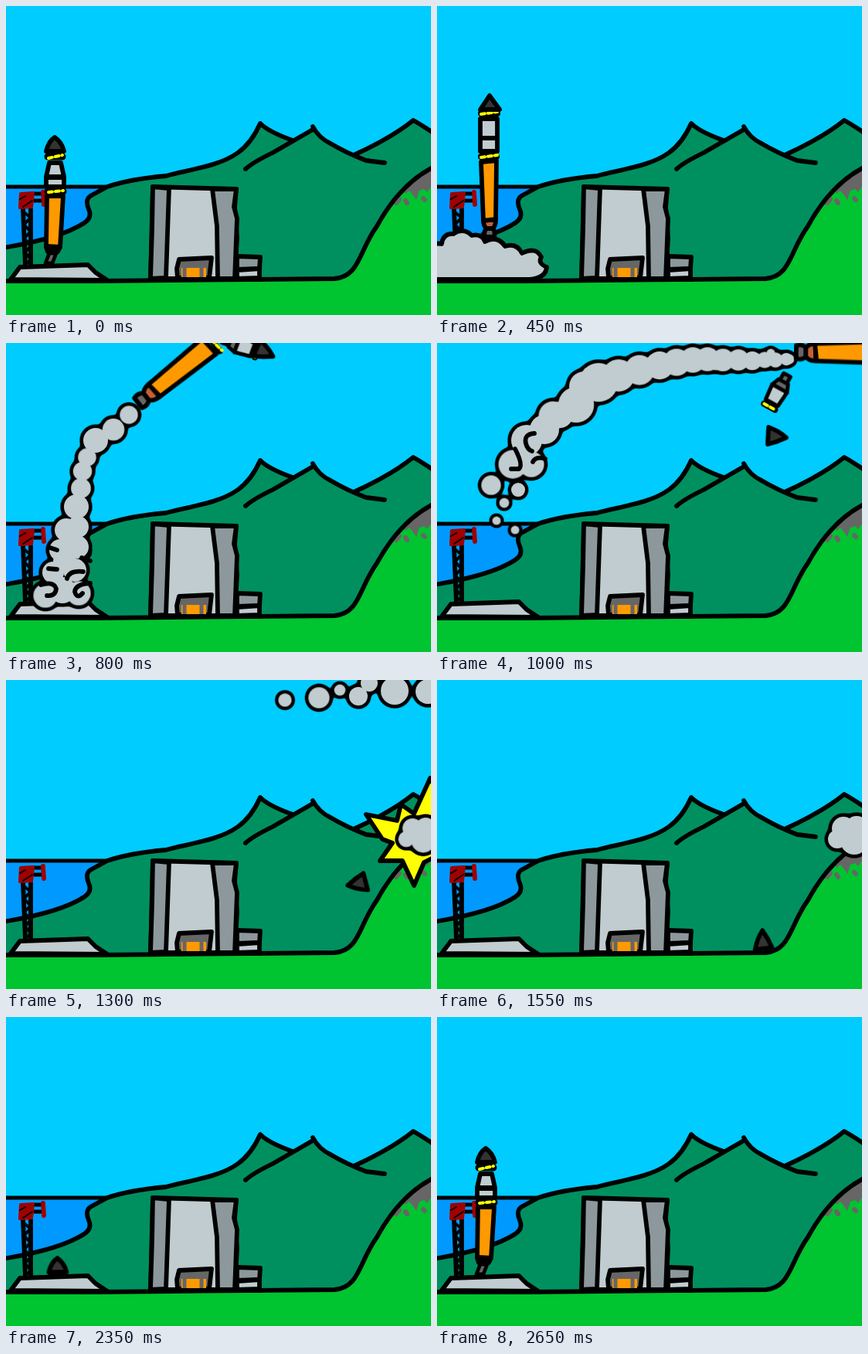
These frames come from a looping animation (550 by 400 pixels, 2.7 s). An HTML page without scripts:

```html
<!DOCTYPE html>
<html lang="en">
<head>
<meta charset="utf-8">
<title>Rocket launch loop</title>
<style>
html, body { margin: 0; width: 100%; height: 100%; overflow: hidden; background: #0cf; }
svg { display: block; width: 100vw; height: 100vh; }
.ink { stroke: #000; stroke-width: 5.8; stroke-linejoin: round; stroke-linecap: round; }
.thin { stroke-width: 4.8; }
.line { fill: none; }
.pale { fill: #c0cccf; }
.steel { fill: #8c989c; }
.dark { fill: #333; }
.grey { fill: #666; }
.orange { fill: #f90; }
.rust { fill: #c66035; }
.yellow { fill: #ff0; }
.stripes { stroke: #ff0; stroke-width: 4; stroke-dasharray: 5 4; fill: none; }
.flight path { vector-effect: non-scaling-stroke; }

.parked, .flight, .upper, .stage, .cone, .puff, .curl, .cloud, .blast {
  animation: 2.7s steps(2) infinite both;
}
.parked { animation-name: parked; }
.flight { animation-name: flight; }
.upper { animation-name: upper; }
.stage { animation-name: stage; }
.cone { animation-name: cone; }
.cloud { animation-name: cloud; transform-origin: 68px 354px; }
.blast { animation-name: blast; transform-origin: 527px 200px; }
.puff, .curl { animation-delay: calc(var(--t) * 1ms); }
.curl { animation-name: curl; }
.puff {
  animation-name: puff;
  animation-timing-function: linear;
  transform-box: fill-box;
  transform-origin: center;
}
.slow { animation-name: slow-puff; }

@keyframes parked {
  0% { opacity: 1; transform: none; animation-timing-function: steps(1); }
  9.25% { opacity: 0; transform: translate(4px, 166px); animation-timing-function: steps(1); }
  85.18% { opacity: 1; transform: translate(4px, 166px); animation-timing-function: steps(7); }
  98.14%, 100% { opacity: 1; transform: none; }
}
@keyframes flight {
  0% { opacity: 0; transform: translate(62px, 314px) scale(.95); animation-timing-function: steps(1); }
  9.25% { opacity: 1; transform: translate(62px, 314px) scale(.95); }
  12.95% { transform: translate(64px, 304px) scale(.97); }
  16.66% { transform: translate(68px, 278px) scale(1); }
  20.36% { transform: translate(80px, 227px) rotate(6deg) scale(1.1, 1.05); }
  24.06% { transform: translate(102px, 158px) rotate(18deg) scale(1.2, 1.1); }
  27.77% { transform: translate(148px, 98px) rotate(40deg) scale(1.3, 1.17); animation-timing-function: steps(1); }
  29.62% { transform: translate(191px, 62px) rotate(52deg) scale(1.35, 1.2); }
  33.32% { transform: translate(335px, 20px) rotate(80deg) scale(1.35, 1.2); }
  37.03% { transform: translate(489px, 12px) rotate(91deg) scale(1.4, 1.15); animation-timing-function: steps(1); }
  38.88% { opacity: 1; transform: translate(575px, 16px) rotate(95deg); animation-timing-function: steps(1); }
  40.73%, 100% { opacity: 0; transform: translate(660px, 20px) rotate(95deg); }
}
@keyframes upper {
  0% { opacity: 1; animation-timing-function: steps(1); }
  29.62%, 100% { opacity: 0; }
}
@keyframes stage {
  0% { opacity: 0; transform: translate(306px, 4px); animation-timing-function: steps(1); }
  29.62% { opacity: 1; transform: translate(306px, 4px) rotate(20deg); }
  33.32% { transform: translate(374px, 23px) rotate(70deg); }
  37.03% { transform: translate(440px, 65px) rotate(119deg); }
  40.73% { transform: translate(490px, 120px) rotate(170deg); }
  44.43% { opacity: 1; transform: translate(525px, 192px) rotate(220deg); animation-timing-function: steps(1); }
  46.29%, 100% { opacity: 0; transform: translate(527px, 200px); }
}
@keyframes cone {
  0% { opacity: 0; transform: translate(334px, 11px); animation-timing-function: steps(1); }
  29.62% { opacity: 1; transform: translate(333px, 11px) rotate(27deg); }
  33.32% { transform: translate(392px, 55px) rotate(16deg); }
  37.03% { transform: translate(438px, 121px) rotate(6deg); animation-timing-function: steps(6); }
  48.14% { transform: translate(456px, 263px) rotate(168deg); }
  51.84% { transform: translate(457px, 320px) rotate(215deg); animation-timing-function: steps(1); }
  53.69% { transform: translate(445px, 338px) rotate(235deg); animation-timing-function: steps(8); }
  68.51% { transform: translate(353px, 339px) rotate(360deg); animation-timing-function: steps(7); }
  81.47% { opacity: 1; transform: translate(314px, 339px) rotate(360deg); animation-timing-function: steps(1); }
  83%, 100% { opacity: 0; transform: translate(314px, 339px) rotate(360deg); }
}
@keyframes cloud {
  0%, 7.4% { transform: scale(0); }
  9.25% { transform: scale(.2); animation-timing-function: steps(4); }
  16.66% { transform: scale(1); }
  20.36% { transform: scale(1.02); animation-timing-function: steps(4); }
  27.77% { transform: scale(.5); animation-timing-function: steps(1); }
  29.62%, 100% { transform: scale(0); }
}
@keyframes blast {
  0% { transform: scale(0); animation-timing-function: steps(1); }
  44.43% { transform: scale(.3); }
  48.14% { transform: none; animation-timing-function: steps(1); }
  50% { transform: scale(1.06); }
  53.69%, 100% { transform: scale(0); }
}
@keyframes puff {
  0% { transform: scale(0); }
  .5% { transform: scale(.65); }
  8%, 12% { transform: none; }
  15%, 100% { transform: scale(0); }
}
@keyframes slow-puff {
  0% { transform: scale(0); }
  2% { transform: scale(.8); }
  8%, 14% { transform: none; }
  18.5%, 100% { transform: scale(0); }
}
@keyframes curl {
  0% { opacity: 0; }
  .1% { opacity: 1; animation-timing-function: steps(1); }
  9%, 100% { opacity: 0; }
}
</style>
</head>
<body>
<svg viewBox="0 0 550 400" preserveAspectRatio="none">
  <defs>
    <clipPath id="above-pad"><path d="M0 0H550V335H0Z"/></clipPath>
    <filter id="outline" filterUnits="userSpaceOnUse" x="-30" y="-30" width="610" height="460" color-interpolation-filters="sRGB">
      <feGaussianBlur in="SourceAlpha" stdDeviation="3.5"/>
      <feComponentTransfer result="edge"><feFuncA type="linear" slope="16" intercept="-.8"/></feComponentTransfer>
      <feMerge><feMergeNode in="edge"/><feMergeNode in="SourceGraphic"/></feMerge>
    </filter>
  </defs>

  <!-- Landscape -->
  <path fill="#0cf" d="M0 0H550V400H0Z"/>
  <path fill="#09f" d="M0 234H135V320H0Z"/>
  <path fill="#009060" d="M0 313Q70 301 101 281Q112 274 107 263Q102 251 109 246L131 234Q160 224 207 220C235 212 275 208 300 190Q318 177 329 152Q340 163 371 174L397 158Q405 171 420 178L450 193Q500 170 527 148L550 164V360H0Z"/>
  <g class="ink line">
    <path class="thin" d="M-4 234H131"/>
    <path d="M-4 313Q70 301 101 281Q112 274 107 263Q102 251 109 246L131 234Q160 224 207 220C235 212 275 208 300 190Q318 177 329 152Q340 163 371 174"/>
    <path d="M310 211Q320 202 345 190L397 160M397 156Q405 171 420 178Q440 190 466 200L490 203M450 193Q500 170 527 148Q538 154 554 165"/>
  </g>
  <path fill="#00c430" d="M0 356L425 353C458 350 456 318 480 285Q510 230 550 210V400H0Z"/>
  <path class="grey" d="M550 210Q530 218 512 236L517 243L522 239L527 245L531 251L535 239L541 237L545 241L550 234Z"/>
  <path stroke="#666" stroke-width="6" stroke-linecap="round" d="M509 250L505 255M517 252L519 255M540 249L542 251"/>
  <path class="ink line" d="M-4 356H120L425 353C458 350 456 318 480 285Q510 230 554 208"/>

  <!-- Falling parts and impact -->
  <path class="blast ink yellow" d="M466 174L506 182L511 161L528 173L549 127L570 165L575 215L551 231L541 236L528 266L513 234L484 234L500 211L487 206Z"/>
  <g class="pale" filter="url(#outline)">
    <circle class="puff slow" style="--t:1200" cx="526" cy="192" r="15"/>
    <circle class="puff slow" style="--t:1200" cx="543" cy="191" r="15"/>
    <circle class="puff slow" style="--t:1200" cx="518" cy="206" r="12"/>
    <circle class="puff slow" style="--t:1200" cx="540" cy="208" r="18"/>
  </g>
  <g class="stage ink thin">
    <path class="grey" d="M-27 -5H-17V5H-27ZM-17 -7L-7 -11V11L-17 7Z"/>
    <path class="pale" d="M-7 -11L14 -9V9L-7 11Z"/>
    <path class="line" stroke-width="8" d="M20 -8V8"/>
    <path class="stripes" stroke-width="3" d="M20 -6V8"/>
  </g>
  <path class="cone ink dark" d="M-10 -11Q3 -8 14 0Q3 7 -9 11Z"/>

  <!-- Assembly building -->
  <g class="ink">
    <path class="steel" d="M299 324L329 325L328 340L299 341Z"/>
    <path class="pale" d="M299 342L328 340V352L299 353Z"/>
    <path class="pale" d="M190 234L298 237L296 260L299 300L296 353H187Z"/>
    <path class="steel" d="M190 234L211 236L207 352L187 353L189 290Z"/>
    <path class="steel" d="M267 237L298 237L295 260L299 275L296 353H274L273 285Z"/>
    <path class="grey" d="M222 352L221 340L224 328L266 326L263 352Z"/>
  </g>
  <path class="orange" d="M227 339H259V352H227Z"/>
  <path stroke="#666" stroke-width="5" d="M231 334V351M253 334V353"/>
  <path class="ink line" d="M187 354H330"/>

  <!-- Launch tower and pad -->
  <g class="ink line">
    <path d="M22 263L25 336M32 263L32 336"/>
    <path stroke-width="4" d="M22 266L32 274L23 283L32 292L23 301L33 310L24 319L33 328L24 335"/>
    <path class="thin" d="M34 243H48M34 252H48"/>
    <path fill="#a00000" stroke="#a00000" stroke-width="4" d="M19 243L35 242L33 260L18 261Z"/>
    <path stroke="#a00000" d="M48 241L49 257"/>
    <path stroke-width="2" d="M18 250L25 246M22 260L34 252"/>
  </g>
  <g clip-path="url(#above-pad)">
    <g class="parked ink">
      <path class="grey thin" d="M56 320H65L60 333H51Z"/>
      <path class="rust" d="M52 312H70L67 318H54Z"/>
      <path class="orange" d="M53 246H74L70 312L52 311Z"/>
      <path class="pale" d="M56 203H71L75 221H52ZM52 222H75V234H52Z"/>
      <path class="line" stroke-width="9" d="M54 195H73M54 240H74"/>
      <path class="dark" d="M52 188Q55 175 63 170Q72 176 75 188Z"/>
      <path class="stripes" stroke-width="3" d="M55 197L73 193M55 241L74 239"/>
    </g>
  </g>
  <path class="ink pale" d="M6 354L18 338L106 335L116 345L131 355Z"/>

  <!-- Exhaust trail, from the pad upwards -->
  <g class="pale" filter="url(#outline)">
    <circle class="puff slow" style="--t:420" cx="51" cy="327" r="16"/>
    <circle class="puff slow" style="--t:420" cx="94" cy="324" r="16"/>
    <circle class="puff slow" style="--t:400" cx="73" cy="320" r="21"/>
    <circle class="puff slow" style="--t:440" cx="61" cy="297" r="14"/>
    <circle class="puff slow" style="--t:450" cx="89" cy="294" r="15"/>
    <circle class="puff slow" style="--t:460" cx="76" cy="283" r="15"/>
    <circle class="puff slow" style="--t:480" cx="70" cy="268" r="14"/>
    <circle class="puff slow" style="--t:490" cx="92" cy="264" r="15"/>
    <circle class="puff slow" style="--t:500" cx="78" cy="242" r="15"/>
    <circle class="puff slow" style="--t:500" cx="93" cy="238" r="14"/>
    <circle class="puff" style="--t:580" cx="91" cy="212" r="16"/>
    <circle class="puff" style="--t:590" cx="97" cy="188" r="13"/>
    <circle class="puff" style="--t:620" cx="99" cy="166" r="13"/>
    <circle class="puff" style="--t:640" cx="105" cy="148" r="13"/>
    <circle class="puff" style="--t:830" cx="98" cy="157" r="20"/>
    <circle class="puff" style="--t:830" cx="122" cy="157" r="18"/>
    <circle class="puff" style="--t:700" cx="116" cy="126" r="20"/>
    <circle class="puff" style="--t:730" cx="139" cy="112" r="19"/>
    <circle class="puff" style="--t:765" cx="159" cy="93" r="17"/>
    <circle class="puff" style="--t:830" cx="150" cy="94" r="20"/>
    <circle class="puff" style="--t:805" cx="180" cy="80" r="24"/>
    <circle class="puff" style="--t:815" cx="190" cy="56" r="20"/>
    <circle class="puff" style="--t:825" cx="209" cy="51" r="27"/>
    <circle class="puff" style="--t:840" cx="235" cy="42" r="23"/>
    <circle class="puff" style="--t:855" cx="262" cy="35" r="22"/>
    <circle class="puff" style="--t:865" cx="288" cy="29" r="21"/>
    <circle class="puff" style="--t:880" cx="310" cy="25" r="21"/>
    <circle class="puff" style="--t:885" cx="331" cy="22" r="20"/>
    <circle class="puff" style="--t:890" cx="350" cy="21" r="19"/>
    <circle class="puff" style="--t:895" cx="370" cy="22" r="18"/>
    <circle class="puff" style="--t:895" cx="390" cy="22" r="17"/>
    <circle class="puff" style="--t:895" cx="408" cy="23" r="15"/>
    <circle class="puff" style="--t:895" cx="424" cy="22" r="13"/>
    <circle class="puff" style="--t:895" cx="438" cy="22" r="12"/>
    <circle class="puff" style="--t:895" cx="452" cy="21" r="10"/>
    <!-- Puffs that linger on both ends -->
    <circle class="puff" style="--t:840" cx="70" cy="184" r="14"/>
    <circle class="puff" style="--t:840" cx="105" cy="190" r="10"/>
    <circle class="puff" style="--t:840" cx="87" cy="207" r="7"/>
    <circle class="puff" style="--t:840" cx="77" cy="230" r="6"/>
    <circle class="puff" style="--t:840" cx="101" cy="242" r="6"/>
    <circle class="puff" style="--t:950" cx="361" cy="26" r="13"/>
    <circle class="puff" style="--t:975" cx="405" cy="23" r="14"/>
    <circle class="puff" style="--t:970" cx="432" cy="13" r="8"/>
    <circle class="puff" style="--t:990" cx="456" cy="21" r="12"/>
    <circle class="puff" style="--t:1005" cx="470" cy="4" r="11"/>
    <circle class="puff" style="--t:1015" cx="503" cy="14" r="18"/>
    <circle class="puff" style="--t:1040" cx="546" cy="15" r="16"/>
  </g>
  <g class="ink line">
    <path class="curl" style="--t:650" d="M45 313Q62 308 65 318Q64 328 53 327M109 311Q90 312 89 322Q92 332 99 324M79 305Q82 294 100 296M55 292L66 293M57 265L66 268M98 278L109 282"/>
    <path class="curl" style="--t:850" d="M126 117Q112 118 115 130Q117 138 123 140M101 137Q112 158 106 163L96 163M140 150Q128 146 124 154"/>
  </g>

  <!-- Rocket in flight -->
  <g class="flight ink">
    <path class="grey" d="M-4 10H4Q8 14 6 21H-6Q-8 14 -4 10Z"/>
    <path class="rust" d="M-8 -1H8Q8 7 4 10H-4Q-8 7 -8 -1Z"/>
    <path class="orange" d="M-11 -76L9 -78L8 -2L-8 0Z"/>
    <path class="line" stroke-width="8" d="M-11 -83H9"/>
    <path class="stripes" d="M-11 -82L10 -85"/>
    <g class="upper">
      <path class="pale" d="M-12 -132H10V-107H-12ZM-12 -107H10V-90H-12Z"/>
      <path class="line" stroke-width="8" d="M-11 -139H10"/>
      <path class="stripes" d="M-11 -138L10 -141"/>
      <path class="dark" d="M-12 -144L0 -162L13 -144Z"/>
    </g>
  </g>
  <path class="cloud ink pale" d="M-12 354V312Q-4 306 6 308Q8 294 21 295Q34 286 45 297Q58 294 62 305Q78 296 88 311Q103 306 110 320Q128 311 135 325Q130 333 142 338Q141 352 120 354Z"/>
</svg>
</body>
</html>
```
